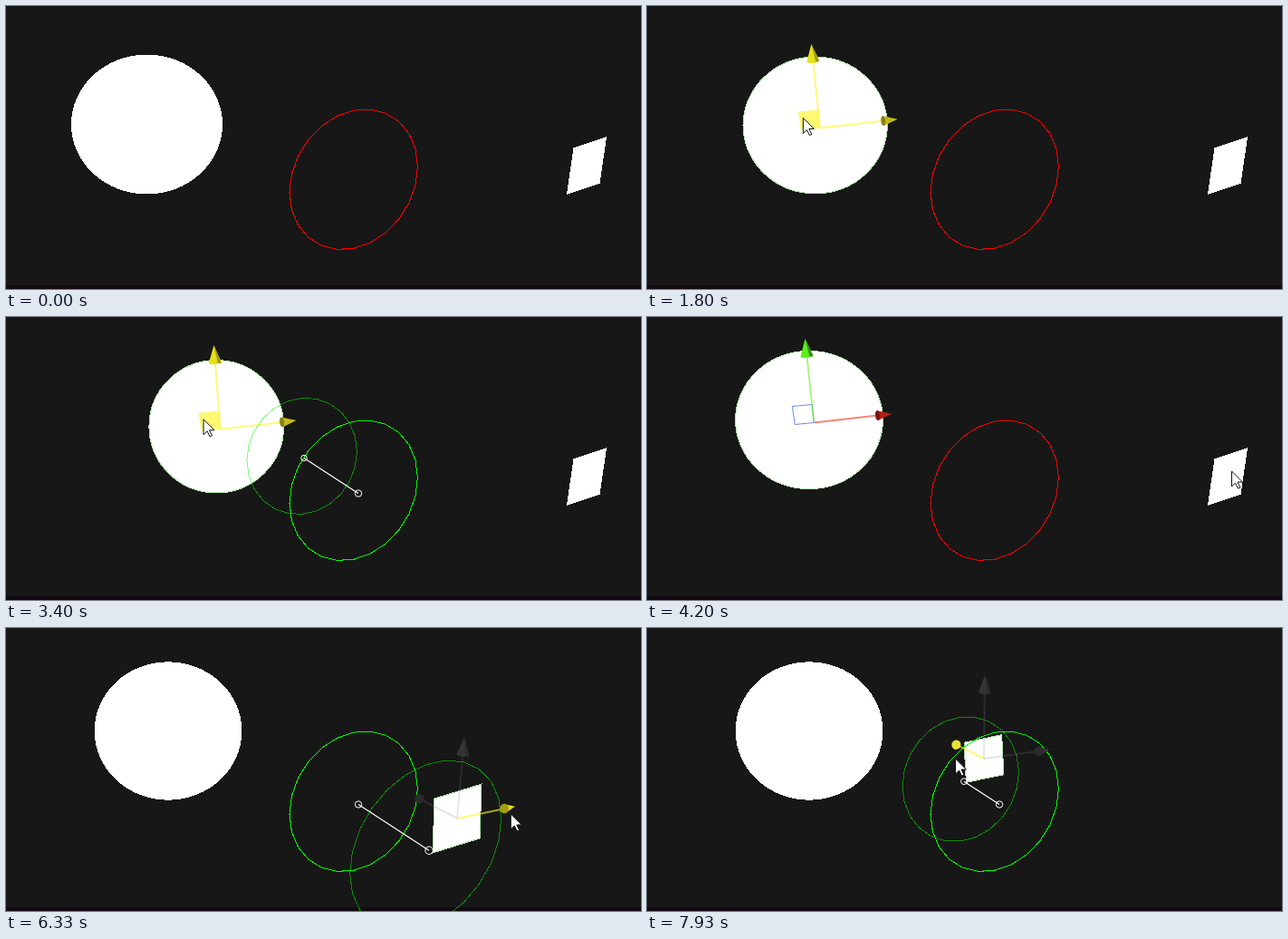
An HTML page for the animation above (8000 ms loop, 701x312 px).

```html
<!DOCTYPE html>
<html lang="en">
<head>
<meta charset="utf-8">
<title>Overlap test</title>
<style>
  html, body { margin: 0; width: 100%; height: 100%; overflow: hidden; background: #171717; }
  svg { display: block; width: 100vw; height: 100vh; }
</style>
</head>
<body>
<svg id="stage" viewBox="0 0 701 312"></svg>
<script>
const LOOP = 8000;
const CRISP = 'shape-rendering="crispEdges"';
const GLOW = 'rgba(255,245,40,.62)';
const stage = document.getElementById('stage');

// Handle colours: shaft, cone, shaded side or cone base.
const YELLOW = [GLOW, '#e6e01c', '#a39a16'];
const OLIVE = [GLOW, '#c4b91a', '#8a8012'];
const BACKLIT = [GLOW, '#5f5a10', '#e8e234'];
const RED = ['rgba(240,60,40,.62)', '#b3201a', '#7d1512'];
const GREEN = ['rgba(110,240,40,.6)', '#5cf01c', '#3a8f18'];
const BLUE = ['rgba(60,100,255,.65)', '#3a6cf0', '#2747a8'];
const GREY = ['rgba(128,128,128,.2)', '#353535', '#2b2b2b'];

const add = (p, ...vectors) => vectors.reduce(([x, y], [dx, dy]) => [x + dx, y + dy], p);
const scale = ([x, y], k) => [x * k, y * k];
const lerp = (a, b, k) => a.map((v, i) => v + (b[i] - v) * k);

// Smooth monotone curve through keys [time, ...values]; it rests at turning points.
function path(t, ...keys) {
  const last = keys.length - 1;
  const [first, end] = [keys[0], keys[last]];
  if (t <= first[0]) return first.slice(1);
  if (t >= end[0]) return end.slice(1);
  const i = keys.findIndex(key => key[0] > t) - 1;
  const span = keys[i + 1][0] - keys[i][0], u = (t - keys[i][0]) / span;
  const rate = (n, c) => (keys[n + 1][c] - keys[n][c]) / (keys[n + 1][0] - keys[n][0]);
  const slope = (n, c) => {
    if (n === 0 || n === last) return 0;
    const before = rate(n - 1, c), after = rate(n, c);
    return before * after > 0 ? 2 * before * after / (before + after) : 0;
  };
  return first.slice(1).map((_, k) => {
    const c = k + 1, a = keys[i][c], b = keys[i + 1][c];
    return a + (b - a) * u * u * (3 - 2 * u) +
      span * u * (1 - u) * (slope(i, c) * (1 - u) - slope(i + 1, c) * u);
  });
}

const poly = (points, attrs) => `<polygon points="${points.join(' ')}" ${attrs}/>`;
const line = (a, b, attrs) =>
  `<line x1="${a[0]}" y1="${a[1]}" x2="${b[0]}" y2="${b[1]}" ${attrs}/>`;

function arrow(from, vector, [shaft, fill, shade], length, radius, flat, sideLit) {
  const angle = Math.atan2(vector[1], vector[0]);
  const tip = add(from, vector);
  const base = add(tip, [-Math.cos(angle) * length, -Math.sin(angle) * length]);
  const end = `<ellipse cx="${-length}" rx="${flat}" ry="${radius}" fill="${sideLit ? fill : shade}"/>`;
  const cone = poly([[0, 0], [-length, -radius], [-length, radius]], `fill="${fill}"`);
  const side = poly([[0, 0], [-length - 1, radius], [-length - 1, radius * .4]], `fill="${shade}"`);
  return line(from, base, `stroke="${shaft}" stroke-width="2"`) +
    `<g transform="translate(${tip}) rotate(${angle * 180 / Math.PI})">` +
    (sideLit ? end + cone + side : cone + end) + '</g>';
}

const upArrow = (from, vector, color) => arrow(from, vector, color, 19, 7, 2, true);

// The circle slid along the depth axis by a screen distance in x.
function ring(depth, color, opacity = 1) {
  const cx = 383.7 + .98 * depth + .0005 * depth ** 2, cy = 191.2 + .63 * depth;
  const rx = 70.7 + .165 * depth, ry = 77.4 + .22 * depth;
  const skew = -.185 - .0018 * depth;
  const points = Array.from({ length: 24 }, (_, i) => {
    const a = i * Math.PI / 12;
    return [cx + rx * Math.cos(a), cy + ry * Math.sin(a + skew)];
  });
  return poly(points, `fill="none" stroke="${color}" stroke-opacity="${opacity}" ${CRISP}`);
}

function castLine(depth) {
  const a = [389, 194.5], b = add(a, [depth, depth * .65]);
  const dot = ([x, y], r) => `<circle cx="${x}" cy="${y}" r="${r}" fill="none" stroke="#fff"/>`;
  return line(a, b, 'stroke="#fff" stroke-width="1.2"') + dot(a, 3.7) + dot(b, 3.7 + depth * .007);
}

// Moving right takes the sphere further from the camera, so it shrinks.
function sphereAt(t) {
  const [x, y] = path(t, [1610, 155.5, 130.5], [1800, 185.5, 131.5], [2060, 236, 123],
    [2400, 236, 123], [2800, 162, 108], [3400, 232.3, 120.8], [3680, 179, 113.5]);
  const dx = x - 155.5, dy = y - 130.5;
  return {
    x, y, dx,
    rx: 83.5 - .125 * dx - .05 * dy,
    ry: 77 - .053 * dx - .025 * dy,
    origin: [x + 5.8 - .02 * dx, y + 3]
  };
}

// slide runs along the x handle, push along the depth handle; both change the quad linearly.
function quadAt(t) {
  const [slide] = path(t, [4780, 0], [5520, 1.014], [5850, .1], [6250, 1]);
  const [push] = path(t, [6730, 0], [7580, 1.93], [7930, 1]);
  const pose = (rest, near, far) =>
    add(lerp(rest, near, slide), scale(lerp(near, far, 1), push), scale(near, -push));
  const origin = pose([641, 176], [498, 210], [372, 144]);
  const across = pose([18.3, -6.2], [26, -8], [20.8, -4.3]);
  const down = pose([-3.8, 25.8], [-1, 30], [1.2, 22]);
  const corner = (i, j) => add(origin, scale(across, i), scale(down, j));
  return {
    origin,
    corners: [corner(-1, -1), corner(1, -1), corner(1, 1), corner(-1, 1)],
    turn: (641 - origin[0]) / 269,
    depth: 78 - 117 * push,
    inRing: slide > .5
  };
}

function sphereGizmo({ origin, dx }, active) {
  const plane = [[0, 0], [-2, -20], [-24, -18], [-21, 2]].map(v => add(origin, v));
  return poly(plane, active ? 'fill="rgba(255,245,40,.65)"' : 'fill="none" stroke="#6f86f5"') +
    arrow(origin, [87 - .04 * dx, -9.7], active ? OLIVE : RED, 16, 5.5, 2.5) +
    upArrow(origin, [-11 + .05 * dx, -92.5], active ? YELLOW : GREEN);
}

function quadGizmo(t, { origin, turn }) {
  const xActive = t >= 4700 && t < 6380, zActive = t >= 6650;
  const dragging = xActive && t >= 4780 || t >= 6720;
  const idle = color => dragging ? GREY : color;
  return arrow(origin, [-54 + 18 * turn, -29 + 11 * turn], zActive ? BACKLIT : idle(BLUE), zActive ? 6 : 3, 5.3, 5) +
    upArrow(origin, [16 - 15 * turn, -86 - 6 * turn], idle(GREEN)) +
    arrow(origin, [54 + 18.5 * turn, -17 + 7 * turn], xActive ? YELLOW : idle(RED), 12, 5.3, 5);
}

function cursorAt(t, sphere, quad) {
  const planeGrip = add(sphere.origin, [-19, -11]);
  const [, drift] = path(t, [4780, 0, -12], [5500, 0, -15], [6300, 0, -5]);
  const xGrip = add(quad.origin, [46 + 24 * quad.turn, drift]);
  const zGrip = add(quad.origin, [-55 + 23 * quad.turn, -21 + 21 * quad.turn]);
  if (t < 1610) return path(t, [800, 291, 1], [1200, 185, 128], [1300, 185, 128], [1530, ...planeGrip]);
  if (t < 3680) return planeGrip;
  if (t < 4780) return path(t, [3700, ...planeGrip], [4120, 645, 170], [4400, 645, 170], [4700, ...xGrip]);
  if (t < 6330) return xGrip;
  if (t < 6730) return path(t, [6330, ...xGrip], [6680, ...zGrip]);
  return zGrip;
}

function cursor([x, y]) {
  const shape = [[0, 0], [0, 17], [4, 13], [7, 19], [9.5, 18], [6.5, 12], [12, 12]];
  return poly(shape, `transform="translate(${x + .5} ${y})" fill="#fff" stroke="#111"`);
}

function draw(t) {
  const sphere = sphereAt(t), quad = quadAt(t);
  const sphereHit = sphere.x > 195;
  const hit = sphereHit || quad.inRing;
  const depth = sphereHit ? -60 : quad.depth;
  const sphereSelected = t >= 1250 && t < 4300, quadSelected = t >= 4300;
  const solid = selected => `fill="#fff" ${selected ? 'stroke="#a6dba0"' : ''} ${CRISP}`;

  stage.innerHTML = [
    '<rect width="701" height="312" fill="#171717"/>',
    '<rect y="308" width="701" height="4" fill="#120a10"/>',
    `<ellipse cx="${sphere.x}" cy="${sphere.y}" rx="${sphere.rx}" ry="${sphere.ry}" ${solid(sphereSelected)}/>`,
    poly(quad.corners, solid(quadSelected)),
    ring(0, hit ? '#0f0' : '#f00'),
    hit ? ring(depth, '#0f0', .5) + castLine(depth) : '',
    sphereSelected ? sphereGizmo(sphere, t >= 1500 && t < 3700) : '',
    quadSelected ? quadGizmo(t, quad) : '',
    t >= 800 ? cursor(cursorAt(t, sphere, quad)) : ''
  ].join('');
}

const start = performance.now();
function tick() {
  draw((performance.now() - start) % LOOP);
  requestAnimationFrame(tick);
}
tick();
</script>
</body>
</html>
```
